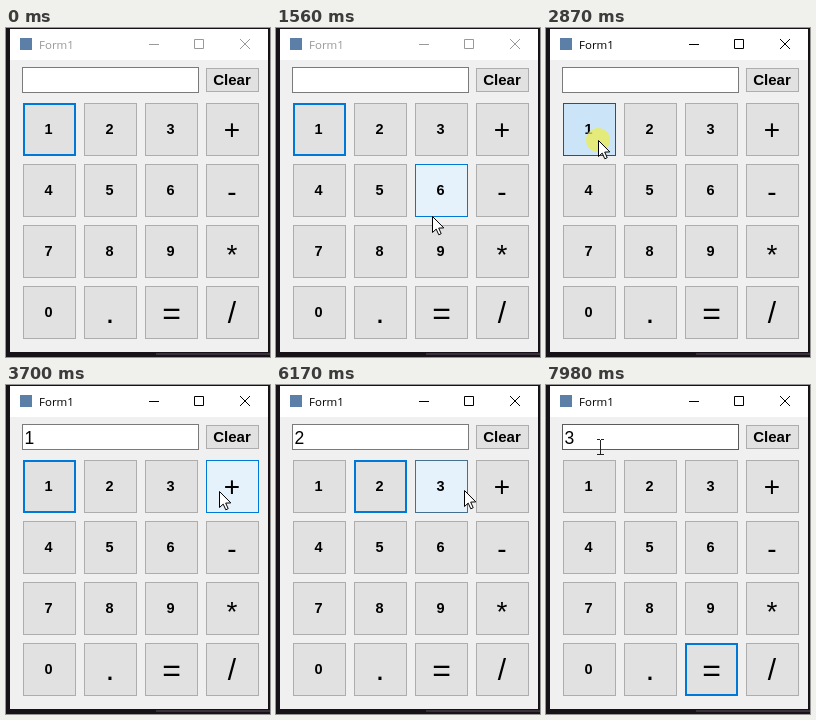
These frames come from a looping animation (264x329 px, 8 s). An HTML page with a canvas:

```html
<!DOCTYPE html>
<html lang="en">
<head>
<meta charset="utf-8">
<title>Calculator form</title>
<style>
  html, body { margin: 0; width: 100%; height: 100%; overflow: hidden; background: #161217; }
  canvas { display: block; width: 264px; height: 329px; }
</style>
</head>
<body>
<canvas id="stage" width="264" height="329"></canvas>
<script>
const ctx = document.getElementById('stage').getContext('2d');
const LOOP = 8000, STEP = 70;
const SANS = '"Liberation Sans", Arial, sans-serif';
const BLUE = '#0078d7';

// Font size and baseline offset from the button top for each operator.
const OPERATORS = { '+': [28, 36], '-': [28, 37], '*': [28, 39], '.': [32, 37], '=': [32, 38], '/': [30, 37] };

const buttons = [...'123+456-789*0.=/'].map((label, i) => ({
  label, x: 17 + 61 * (i % 4), y: 75 + 61 * Math.floor(i / 4), w: 53, h: 53,
  hoverEdge: label === '3' ? '#45708f' : BLUE
}));
buttons.push({ label: 'Clear', x: 200, y: 40, w: 53, h: 24, hoverEdge: BLUE });

// Pointer paths: [time, x, y] points; the pointer rests between paths.
const paths = [
  [[940, 254, 283], [1010, 232, 240], [1080, 205, 196], [1150, 178, 180], [1290, 158, 204]],
  [[1560, 156, 188], [1770, 125, 172], [2050, 82, 142], [2330, 47, 115], [2670, 52, 112]],
  [[3010, 57, 111], [3290, 120, 106], [3630, 212, 106], [3770, 222, 106]],
  [[3980, 216, 106], [4200, 150, 106], [4480, 101, 109]],
  [[5680, 106, 108], [5960, 145, 106], [6170, 188, 105], [6240, 204, 125], [6450, 207, 234],
   [6590, 200, 268], [6730, 178, 282], [6860, 168, 285]],
  [[7270, 165, 278], [7550, 122, 195], [7760, 80, 110], [7980, 54, 62]]
];

const clicks = [
  { time: 2870, label: '1', shows: '1' },
  { time: 3840, label: '+', shows: '' },
  { time: 5210, label: '2', shows: '2' },
  { time: 6930, label: '=', shows: '3' }
];

function pointerAt(t) {
  const path = paths.filter(p => p[0][0] <= t).pop();
  if (!path) return null;
  const start = path[0][0];
  const time = start + Math.floor((t - start) / STEP + 1e-6) * STEP;
  const next = path.findIndex(p => p[0] > time);
  if (next < 0 || t >= path[path.length - 1][0]) {
    const [, x, y] = path[path.length - 1];
    return { x, y };
  }
  const [t0, x0, y0] = path[next - 1], [t1, x1, y1] = path[next];
  const k = (time - t0) / (t1 - t0);
  return { x: Math.round(x0 + (x1 - x0) * k), y: Math.round(y0 + (y1 - y0) * k) };
}

const inside = (p, b) => p && p.x >= b.x && p.x < b.x + b.w && p.y >= b.y && p.y < b.y + b.h;

function fill(color, x, y, w, h) {
  ctx.fillStyle = color;
  ctx.fillRect(x, y, w, h);
}

function box(x, y, w, h, face, edge, line = 1) {
  fill(edge, x, y, w, h);
  fill(face, x + line, y + line, w - 2 * line, h - 2 * line);
}

function text(string, x, y, font, color = '#000', align = 'center') {
  ctx.font = font;
  ctx.fillStyle = color;
  ctx.textAlign = align;
  ctx.fillText(string, x, y);
}

function drawWindow(active) {
  fill('#161217', 0, 0, 264, 329);
  fill('#3b2f3d', 150, 325, 114, 2);
  fill('#f0f0f0', 4, 1, 258, 323);
  fill('#fff', 4, 1, 258, 31);
  fill('#5b7fa6', 14, 10, 12, 12);
  const ink = active ? '#000' : '#999';
  text('Form1', 33, 21, '11.5px "Open Sans", "Noto Sans", sans-serif', ink, 'left');
  ctx.strokeStyle = ink;
  ctx.lineWidth = 1;
  ctx.beginPath();
  ctx.moveTo(143, 16.5); ctx.lineTo(153, 16.5);
  ctx.rect(188.5, 11.5, 9, 9);
  ctx.moveTo(234, 11); ctx.lineTo(244, 21);
  ctx.moveTo(244, 11); ctx.lineTo(234, 21);
  ctx.stroke();
}

function drawButton(b, hovered, pressed, focused) {
  if (pressed) box(b.x, b.y, b.w, b.h, '#cce4f7', '#1a5686');
  else if (hovered) box(b.x, b.y, b.w, b.h, '#e5f1fb', b.hoverEdge);
  else if (focused) box(b.x, b.y, b.w, b.h, '#e1e1e1', BLUE, 2);
  else box(b.x, b.y, b.w, b.h, '#e1e1e1', '#adadad');

  const operator = OPERATORS[b.label];
  if (operator) text(b.label, b.x + 26 + (b.label === '=' ? 0.5 : 0), b.y + operator[1], `${operator[0]}px ${SANS}`);
  else if (b.label === 'Clear') text(b.label, b.x + 26, b.y + 17, `bold 15px ${SANS}`);
  else text(b.label, b.x + 25.5, b.y + 31, `bold 14.5px ${SANS}`);
}

function drawArrow({ x, y }) {
  const outline = [[0, 0], [0, 16], [3.7, 12.6], [6.3, 18.3], [8.7, 17.2], [6.2, 11.6], [11.3, 11.4]];
  ctx.beginPath();
  outline.forEach(([dx, dy]) => ctx.lineTo(x + 0.5 + dx, y + 0.5 + dy));
  ctx.closePath();
  ctx.fillStyle = '#fff';
  ctx.fill();
  ctx.strokeStyle = '#000';
  ctx.lineWidth = 1;
  ctx.stroke();
}

function drawBeam({ x, y }) {
  fill('#222', x, y - 7, 1, 15);
  for (const end of [y - 8, y + 7]) {
    fill('#222', x - 3, end, 3, 1);
    fill('#222', x + 1, end, 3, 1);
  }
}

function draw(t) {
  const pointer = pointerAt(t);
  const last = clicks.filter(c => c.time <= t).pop();
  const down = last && t < last.time + STEP;
  const released = clicks.filter(c => c.time + STEP <= t).pop();
  const focus = last ? last.label : '1';
  const field = { x: 16, y: 39, w: 177, h: 26 };
  const overField = inside(pointer, field);

  drawWindow(t >= clicks[0].time);
  box(field.x, field.y, field.w, field.h, '#fff', overField ? '#5a5a5a' : '#7a7a7a');
  text(released ? released.shows : '', 18.5, 59, `17.5px ${SANS}`, '#000', 'left');
  for (const b of buttons) {
    const hovered = inside(pointer, b);
    drawButton(b, hovered, hovered && down, b.label === focus);
  }

  if (!pointer) return;
  if (down) {
    ctx.fillStyle = 'rgba(236, 238, 80, 0.75)';
    ctx.beginPath();
    ctx.arc(pointer.x, pointer.y, 12, 0, 2 * Math.PI);
    ctx.fill();
  }
  (overField ? drawBeam : drawArrow)(pointer);
}

const began = performance.now();
function frame() {
  draw((performance.now() - began) % LOOP);
  requestAnimationFrame(frame);
}
frame();
</script>
</body>
</html>
```
